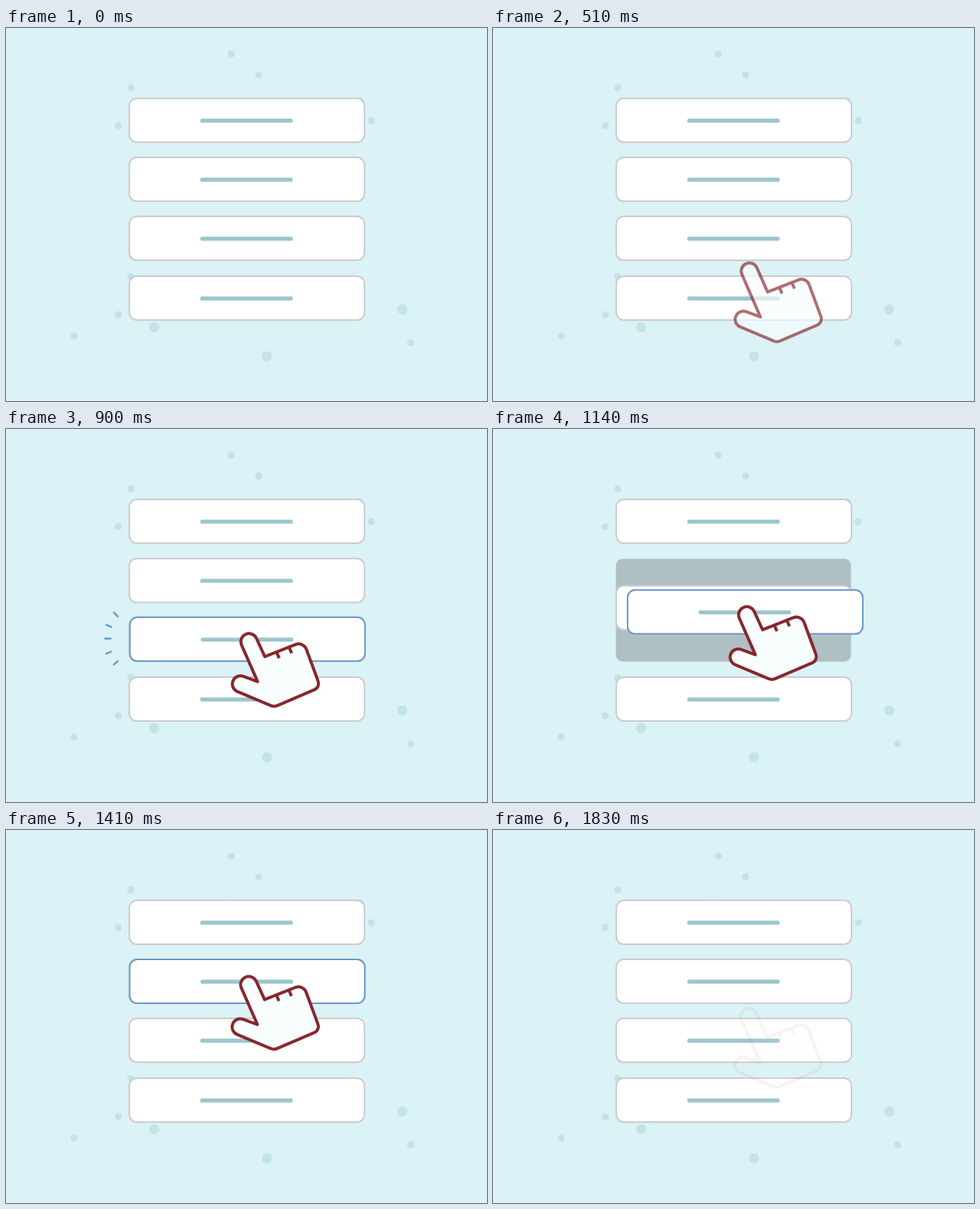
An HTML page for the animation above (3 s loop, 636x493 px).

```html
<!DOCTYPE html>
<html lang="en">
<head>
<meta charset="utf-8">
<title>Drag to reorder</title>
<style>
  html, body { margin: 0; width: 100%; height: 100%; overflow: hidden; background: #dbf2f6; }
  svg { display: block; }
  #dots { fill: #c3e3e7; }
  .slot { fill: #afc0c4; }
  #card rect { fill: #fff; stroke: #ccc; stroke-width: 2; }
  #card line { stroke: #9dc6cd; stroke-width: 5.4; stroke-linecap: round; }
  #glow { fill: none; stroke: #699bca; stroke-width: 2; }
  #burst { fill: none; stroke: #699bca; stroke-width: 2.5; stroke-linecap: round; }
  #hand path { fill: #f8fdfe; stroke: #87272d; stroke-width: 4; stroke-linejoin: round; }
</style>
</head>
<body>
<svg width="636" height="493" viewBox="0 0 636 493">
  <defs>
    <g id="card">
      <rect x="163" y="0" width="311" height="58" rx="10"/>
      <line x1="259.5" y1="29.5" x2="376.5" y2="29.5"/>
    </g>
  </defs>
  <g id="dots"></g>
  <rect class="slot" x="162.5" y="171.5" width="311" height="58" rx="9"/>
  <rect class="slot" x="162.5" y="249.5" width="311" height="58" rx="9"/>
  <use href="#card" y="93"/>
  <use href="#card" y="328"/>
  <use href="#card" id="other"/>
  <g id="dragged">
    <use href="#card"/>
    <rect id="glow" x="163" y="0" width="311" height="58" rx="10"/>
  </g>
  <path id="burst"/>
  <g id="hand">
    <path id="outline"/>
    <path d="M357.3 295.5l3.2 7.5M373.8 289l3.2 7.5"/>
  </g>
</svg>
<script>
const LOOP = 3000, STEP = 30, LAST = 1830;
const $ = id => document.getElementById(id);
const set = (id, name, value) => $(id).setAttribute(name, value);
const move = (id, x, y) => set(id, 'transform', `translate(${x} ${y})`);
const ramp = (t, from, to) => Math.min(1, Math.max(0, (t - from) / (to - from)));
const ease = u => (1 - Math.cos(Math.PI * u)) / 2;

const smallDots = [[298, 34.5], [334, 62], [165, 79], [148.5, 129], [483, 122.5], [290, 96.5],
  [468, 96.5], [165, 328.5], [148.5, 379], [90, 407], [535, 416]];
const bigDots = [[196, 395.5], [345, 434], [524, 372]];
const dot = r => ([x, y]) => `<circle cx="${x}" cy="${y}" r="${r}"/>`;
$('dots').innerHTML = smallDots.map(dot(4.7)).join('') + bigDots.map(dot(6.7)).join('');

// Click rays: inner x, y then outer x, y, relative to the card's middle
const rays = [[151, -26, 142.7, -34.3], [143.3, -13.5, 132.7, -18.2], [143, 0, 131, 0],
  [142.5, 15.7, 132.7, 19.8], [150.7, 27, 142.7, 34.3]];

function burstPath(t, start, cy) {
  const grow = ramp(t, start, start + 110), shrink = ramp(t, start + 118, start + 200);
  if (grow === 0 || shrink === 1) return '';
  return rays.map(([x, y, ox, oy]) => {
    const at = k => `${x + (ox - x) * k} ${cy + y + (oy - y) * k}`;
    return `M${at(shrink)}L${at(grow)}`;
  }).join('');
}

// reach: 0 = finger pressed, 1 = finger stretched out
function handPath(reach) {
  const dx = -3.2 * reach, dy = -8 * reach;
  return `M332 334L${310.6 + dx} ${285.3 + dy}A10.8 10.8 0 0 1 ${330.4 + dx} ${276.7 + dy}
    L341.5 301L382 285.1A10.8 10.8 0 0 1 396.2 290.7L411.8 332.9A9 9 0 0 1 407 344.8
    L358.5 365.5Q353.5 367.8 349 365.5L304.9 347A10.8 10.8 0 0 1 313 327Z`;
}

function draw(t) {
  const away = 1 - ease(ramp(t, 360, 636));
  const drag = ease(ramp(t, 885, 1420));
  const leave = ease(ramp(t, 1610, 1850));
  const swing = 15 * Math.max(0, Math.sin(Math.PI * drag)) ** 0.6;
  const lift = -78 * drag;

  move('other', 0, 171 + 78 * drag);
  move('dragged', swing, 249 + lift);
  set('glow', 'opacity', ramp(t, 720, 780) - ramp(t, 1440, 1500));

  set('burst', 'd', burstPath(t, 750, 277) + burstPath(t, 1470, 200.5));

  set('outline', 'd', handPath(1 - ramp(t, 630, 750) + ramp(t, 1410, 1530)));
  move('hand', 50 * away + swing + 21.5 * leave, 111 * away + lift * 0.987 + 51.2 * leave);
  set('hand', 'opacity', t < 390 ? 0 : ramp(t, 370, 580) * (1 - ramp(t, 1640, 1840)));
}

const begin = performance.now();
function frame() {
  const t = (performance.now() - begin) % LOOP;
  draw(Math.min(LAST, Math.floor(t / STEP) * STEP));
  requestAnimationFrame(frame);
}
frame();
</script>
</body>
</html>
```
